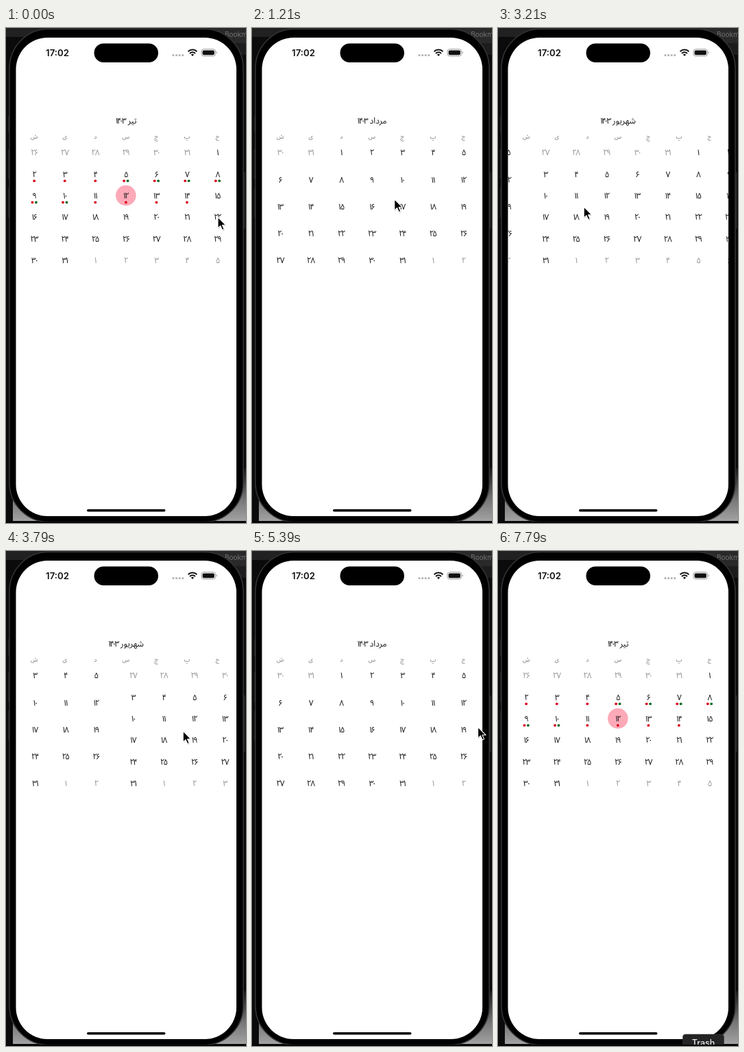
An HTML page for the animation above (8 s loop, 350 by 720 pixels).

```html
<!DOCTYPE html>
<html lang="fa">
<head>
<meta charset="utf-8">
<title>Calendar</title>
<style>
  html, body { margin: 0; width: 100%; height: 100%; overflow: hidden; background: #0b0b0b; }
  svg { display: block; width: 350px; height: 720px; }
  text { text-anchor: middle; }
  .fa { font-family: "Noto Sans Arabic", "DejaVu Sans", sans-serif; direction: rtl; }
  .day { font-size: 12px; letter-spacing: -0.9px; fill: #1a1a1a; direction: ltr; }
  .out { fill: #989898; }
  .head { font-size: 8.5px; fill: #777; }
  .title { font-size: 12px; fill: #161616; }
  .title tspan { letter-spacing: -1.3px; }
  .ui { font-family: Inter, "Liberation Sans", sans-serif; }
</style>
</head>
<body>
<svg id="stage" viewBox="0 0 350 720" xmlns="http://www.w3.org/2000/svg">
  <defs>
    <clipPath id="screen"><rect x="14.5" y="165" width="321.5" height="190"/></clipPath>
    <linearGradient id="desk" x2="0" y2="1">
      <stop offset="0" stop-color="#181818"/>
      <stop offset=".6" stop-color="#777"/>
      <stop offset="1" stop-color="#a2a2a2"/>
    </linearGradient>
  </defs>

  <!-- desktop -->
  <rect width="350" height="720" fill="#0b0b0b"/>
  <rect width="350" height="13" fill="#212121"/>
  <rect x="300" width="50" height="22" fill="#292929"/>
  <rect x="300" y="22" width="50" height="17" fill="#1c1c1c"/>
  <text class="ui" x="319" y="13" font-size="10" fill="#737373" style="text-anchor:start">Bookm</text>
  <rect x="10" y="640" width="340" height="77" fill="url(#desk)"/>

  <!-- phone -->
  <g fill="#222">
    <rect x="3" y="128" width="3" height="24" rx="1"/>
    <rect x="3" y="176" width="3" height="44" rx="1"/>
    <rect x="3" y="232" width="3" height="44" rx="1"/>
    <rect x="345" y="210" width="4" height="82" rx="1"/>
  </g>
  <rect x="5" y="1.5" width="341" height="717" rx="57" fill="#000" stroke="#343434" stroke-width="1.6"/>
  <rect x="14.5" y="14" width="321.5" height="696" rx="46" fill="#fff"/>
  <rect x="128.5" y="22.5" width="93.5" height="27.5" rx="13.75"/>
  <rect x="118" y="700" width="114.5" height="3.6" rx="1.8"/>

  <!-- status bar -->
  <text class="ui" x="75" y="40.8" font-size="13.2" font-weight="600" fill="#111">17:02</text>
  <g fill="#b4b4b4">
    <circle cx="244" cy="39.6" r="1.6"/><circle cx="248.6" cy="39.6" r="1.6"/>
    <circle cx="253.2" cy="39.6" r="1.6"/><circle cx="257.8" cy="39.6" r="1.6"/>
  </g>
  <g fill="none" stroke="#111" stroke-width="2">
    <path d="M265.6 34.2a9 9 0 0 1 12.8 0"/>
    <path d="M268 37a5.7 5.7 0 0 1 8 0"/>
  </g>
  <path d="M269.9 38.7a3 3 0 0 1 4.2 0L272 41Z" fill="#111"/>
  <rect x="285" y="30.8" width="20.5" height="10" rx="3.2" fill="none" stroke="#999"/>
  <rect x="286.6" y="32.4" width="17.3" height="6.8" rx="1.9" fill="#111"/>
  <path d="M306.8 34v3.6a2 2 0 0 0 0-3.6" fill="#999"/>

  <text id="title" class="fa title" x="175.2" y="139"></text>
  <g id="heads"></g>
  <g clip-path="url(#screen)"><g id="pages"></g></g>

  <g id="trash">
    <rect x="269.5" y="703" width="60" height="22" rx="4" fill="#242424" stroke="#3a3a3a" stroke-width=".6"/>
    <text class="ui" x="299.5" y="720" font-size="12.5" font-weight="500" fill="#eee">Trash</text>
  </g>
  <rect y="718" width="350" height="2" fill="#050505"/>

  <g id="cursor">
    <path d="M0 0V16.6L3.9 13L6.5 19.2L9.3 18L6.7 12H11.6Z" transform="translate(.6 1)" fill="#000" opacity=".18"/>
    <path d="M0 0V16.2L3.8 12.7L6.4 18.7L9 17.6L6.4 11.7H11.4Z" fill="#000" stroke="#fff" stroke-width="1.1" stroke-linejoin="round"/>
  </g>
</svg>

<script>
const LOOP = 8000, PAGE = 321.5, COL = 44.55, LEFT = 41.2, TOP = 181, SPAN = 156.5;
const $ = id => document.getElementById(id);
const fa = n => String(n).replace(/\d/g, d => String.fromCharCode(0x6f0 + +d));

// lead: days of the previous month shown before day 1
const months = [
  { name: 'تیر', lead: 6, weeks: 6 },
  { name: 'مرداد', lead: 2, weeks: 5 },
  { name: 'شهریور', lead: 5, weeks: 6 }
];

// [ms, position in pages]
const scroll = [
  [0, 0], [30, 0], [180, .12], [400, .5], [560, .8], [760, .98], [900, 1],
  [1450, 1], [1600, 1.14], [1780, 1.5], [1980, 1.8], [2250, 1.96], [2600, 2],
  [3060, 2], [3210, 1.913], [3880, 1.5], [3960, 1.46], [4390, 1.655], [4480, 1.68],
  [4750, 1.48], [4950, 1.2], [5150, 1.04], [5330, 1],
  [6270, 1], [6390, .94], [6550, .838], [6800, .5], [6980, .2], [7130, .04], [7240, 0], [LOOP, 0]
];

// [ms, x, y]
const pointer = [
  [0, 309, 275], [30, 309, 275], [400, 160, 263], [600, 130, 258], [850, 130, 254],
  [1210, 207.5, 249], [1450, 300, 254], [1780, 145, 258], [2000, 107, 260], [2100, 105, 260],
  [2480, 326, 258], [2560, 330, 257], [2880, 97, 260], [3060, 97, 260], [3210, 125, 260],
  [3930, 268, 262], [4390, 179.5, 259], [4480, 168, 258], [5000, 305, 257], [5330, 329.5, 256],
  [5610, 329.5, 256], [6230, 151, 266], [6550, 204.5, 266], [6950, 318, 264], [7330, 318, 264],
  [7600, 306, 580], [7740, 299, 725], [LOOP, 299, 725]
];

function add(parent, tag, attrs, text) {
  const el = document.createElementNS('http://www.w3.org/2000/svg', tag);
  for (const k in attrs) el.setAttribute(k, attrs[k]);
  if (text) el.textContent = text;
  parent.append(el);
  return el;
}

function addEvents(page, day, x, y) {
  const dot = (dx, fill) => add(page, 'circle', { cx: x + dx, cy: y + 10, r: 1.9, fill });
  const pair = day >= 5 && day <= 10;
  dot(pair ? -2.7 : 0, '#d9001b');
  if (pair) dot(2.7, '#0a6b24');
}

function buildPage({ lead, weeks }, index) {
  const page = add($('pages'), 'g', { transform: `translate(${index * PAGE})` });
  for (let i = 0; i < weeks * 7; i++) {
    const day = i - lead + 1;
    const inside = day >= 1 && day <= 31;
    const x = LEFT + i % 7 * COL;
    const y = TOP + Math.floor(i / 7) * SPAN / (weeks - 1);
    if (index === 0 && day === 12) add(page, 'circle', { cx: x, cy: y, r: 14.8, fill: '#fda9b8' });
    add(page, 'text', { class: inside ? 'fa day' : 'fa day out', x, y: y + 4.4 }, fa((day + 30) % 31 + 1));
    if (index === 0 && day >= 2 && day <= 14) addEvents(page, day, x, y);
  }
}

// Smooth curve through the steps that never overshoots them
function at(steps, t, k) {
  let i = 0;
  while (i < steps.length - 2 && t >= steps[i + 1][0]) i++;
  const slope = j => steps[j] && steps[j + 1]
    ? (steps[j + 1][k] - steps[j][k]) / (steps[j + 1][0] - steps[j][0]) : 0;
  const tangent = j => {
    const a = slope(j - 1), b = slope(j);
    return a * b > 0 ? 2 * a * b / (a + b) : 0;
  };
  const [a, b] = [steps[i], steps[i + 1]];
  const h = b[0] - a[0], u = (t - a[0]) / h, v = 1 - u;
  return v * v * (1 + 2 * u) * a[k] + u * u * (3 - 2 * u) * b[k]
    + h * u * v * (v * tangent(i) - u * tangent(i + 1));
}

let shown = -1;
function setTitle(index) {
  if (index === shown) return;
  shown = index;
  $('title').textContent = months[index].name + ' ';
  add($('title'), 'tspan', {}, fa(1403));
}

function draw() {
  const t = performance.now() % LOOP;
  const pos = at(scroll, t, 1);
  $('pages').setAttribute('transform', `translate(${-pos * PAGE})`);
  setTitle(Math.round(pos));
  $('cursor').setAttribute('transform', `translate(${at(pointer, t, 1)} ${at(pointer, t, 2)})`);
  $('trash').style.display = t >= 7680 ? '' : 'none';
  requestAnimationFrame(draw);
}

[...'شیدسچپج'].forEach((c, i) =>
  add($('heads'), 'text', { class: 'fa head', x: LEFT + i * COL, y: 160.5 }, c));
months.forEach(buildPage);
draw();
</script>
</body>
</html>
```
